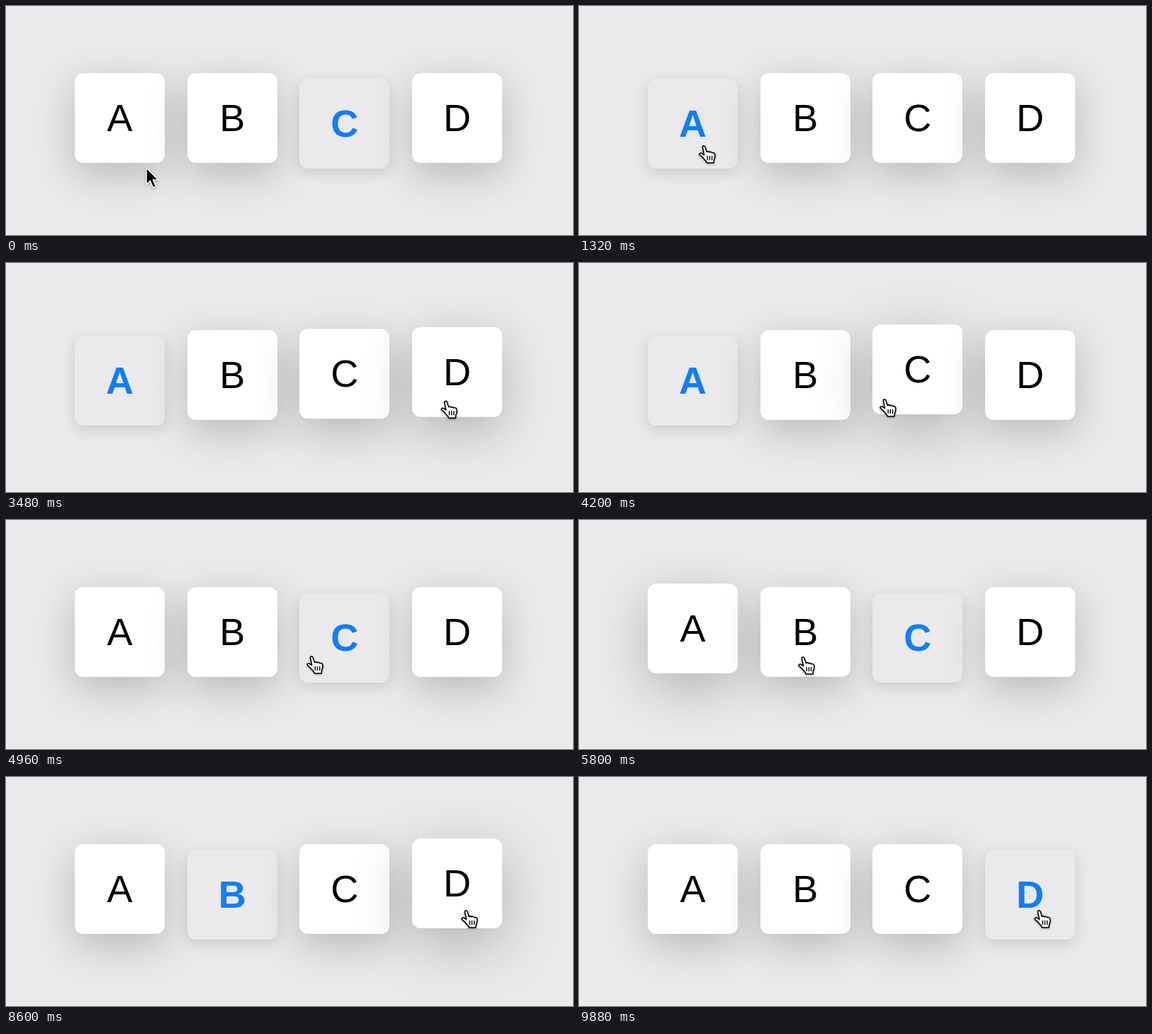
These frames come from a looping animation (800 px wide and 324 px high, 9.92 s). An HTML page:

```html
<!DOCTYPE html>
<html lang="en">
<head>
<meta charset="utf-8">
<style>
  html, body { margin: 0; width: 100%; height: 100%; overflow: hidden; background: #ebe9ec; }
  #stage { position: relative; width: 800px; height: 324px; overflow: hidden; }
  #stage::after { content: ""; position: absolute; left: 0; right: 0; bottom: 0; height: 1px; background: #f8f7f8; }
  .key {
    position: absolute; top: 0; width: 127px; height: 127px; border-radius: 12px;
    font: 54px/127px "Liberation Sans", Arial, sans-serif; text-align: center;
  }
  svg { position: absolute; left: 0; top: 0; overflow: visible; filter: drop-shadow(0 1.5px 1.5px rgba(0,0,0,.35)); }
</style>
</head>
<body>
<div id="stage">
  <svg id="arrow" width="20" height="32">
    <path d="M0 0V23.5L5.4 18.6L9.4 28L13.6 26.2L9.6 17H17Z" fill="#000" stroke="#fff" stroke-width="1.6"/>
  </svg>
  <svg id="hand" width="26" height="28">
    <path d="M5.5 3.5C4.8 1 8 0 9 2.5L11.3 9.5C12 8.6 14.5 8.6 15 10C16 9 18.2 9.3 18.6 10.8C20 10 22.3 10.6 22.6 12.5C23.3 15 22.8 18 21.5 20.5L21 25H11.5C10.5 22 8 20.5 6.5 18.5C5 16.3 3 15 1.3 13.5C.3 12 2 10.5 4 11.3L7.5 13.5Z"
      fill="#fff" stroke="#000" stroke-width="1.6" stroke-linejoin="round"/>
    <path d="M12.2 15v6M15.4 15v6M18.6 15v6" stroke="#000" stroke-width="1.4"/>
  </svg>
</div>
<script>
const LOOP = 9920, FADE = 300, SIZE = 127;
const REST = 95, UP = 87, DOWN = 103;

// Each track is a start value followed by [time, new target].
const keys = [
  { label: "A",
    y: [REST, [120, UP], [420, DOWN], [4560, REST], [5470, UP], [5730, REST]],
    on: [0, [620, 1], [4560, 0]] },
  { label: "B",
    y: [REST, [2300, UP], [2475, REST], [5303, UP], [5432, REST], [5790, UP], [6550, DOWN], [9350, REST]],
    on: [0, [7370, 1], [9350, 0]] },
  { label: "C",
    y: [DOWN, [620, REST], [2520, UP], [3340, REST], [3755, UP], [4250, DOWN], [7370, REST], [8202, UP], [8318, REST]],
    on: [1, [620, 0], [4560, 1], [7370, 0]] },
  { label: "D",
    y: [REST, [3390, UP], [3730, REST], [8348, UP], [8700, DOWN]],
    on: [0, [9350, 1]] },
];

// Pointer tip: time, x, y
const path = [
  [0, 198, 229], [60, 198, 229], [320, 176, 198], [2100, 176, 198], [2700, 480, 198],
  [3200, 480, 198], [3560, 640, 195], [3640, 640, 195], [3880, 431, 193], [5200, 431, 193],
  [5560, 185, 196], [5680, 185, 196], [5800, 316, 194], [6000, 316, 194], [7040, 306, 195],
  [7440, 346, 192], [8080, 346, 192], [8480, 649, 189], [LOOP, 649, 189],
];

const stage = document.getElementById("stage");
const arrow = document.getElementById("arrow");
const hand = document.getElementById("hand");

keys.forEach((key, i) => {
  key.x = 97 + i * 476 / 3;
  key.el = document.createElement("div");
  key.el.className = "key";
  key.el.textContent = key.label;
  key.el.style.left = key.x + "px";
  stage.insertBefore(key.el, arrow);
});

const mix = (a, b, p) => a + (b - a) * p;
const mixAll = (a, b, p) => a.map((v, i) => mix(v, b[i], p));
const rgb = c => `rgb(${c.map(Math.round)})`;
const smooth = u => u * u * (3 - 2 * u);

// cubic-bezier(.25, .1, .25, 1)
function ease(x) {
  if (x <= 0 || x >= 1) return x <= 0 ? 0 : 1;
  let lo = 0, hi = 1, s;
  for (let i = 0; i < 20; i++) {
    s = (lo + hi) / 2;
    if (.75 * s * (1 - s) + s ** 3 < x) lo = s; else hi = s;
  }
  return .3 * s * (1 - s) ** 2 + 3 * s * s * (1 - s) + s ** 3;
}

function valueAt([start, ...changes], t) {
  let from = start, to = start, since = -FADE;
  for (const [time, target] of changes) {
    if (time > t) break;
    from = mix(from, to, ease((time - since) / FADE));
    to = target;
    since = time;
  }
  return mix(from, to, ease((t - since) / FADE));
}

function pointerAt(t) {
  const i = path.findIndex(p => p[0] > t);
  const [t0, ...a] = path[i - 1], [t1, ...b] = path[i];
  return mixAll(a, b, smooth((t - t0) / (t1 - t0)));
}

// Shadow offset, blur and opacity
const shadows = { up: [22, 80, .25], rest: [16, 56, .22], down: [6, 20, .14] };

function drawKey(key, t) {
  const y = valueAt(key.y, t), on = valueAt(key.on, t);
  const [dy, blur, alpha] = mixAll(shadows.rest, y < REST ? shadows.up : shadows.down, Math.abs(y - REST) / 8);
  Object.assign(key.el.style, {
    transform: `translateY(${y}px)`,
    background: rgb(mixAll([255, 255, 255], [235, 233, 236], on)),
    color: rgb(mixAll([0, 0, 0], [15, 125, 252], on)),
    fontWeight: on >= .5 ? 700 : 400,
    boxShadow: `0 ${dy}px ${blur}px rgba(0,0,0,${alpha})`,
  });
}

function draw(t) {
  keys.forEach(key => drawKey(key, t));
  const [x, y] = pointerAt(t);
  const over = y < REST + SIZE && keys.some(key => x >= key.x && x <= key.x + SIZE);
  hand.style.display = over ? "" : "none";
  arrow.style.display = over ? "none" : "";
  hand.style.transform = `translate(${x - 7}px, ${y - 1}px)`;
  arrow.style.transform = `translate(${x}px, ${y}px)`;
}

const begin = performance.now();
function tick() {
  draw((performance.now() - begin) % LOOP);
  requestAnimationFrame(tick);
}
tick();
</script>
</body>
</html>
```
